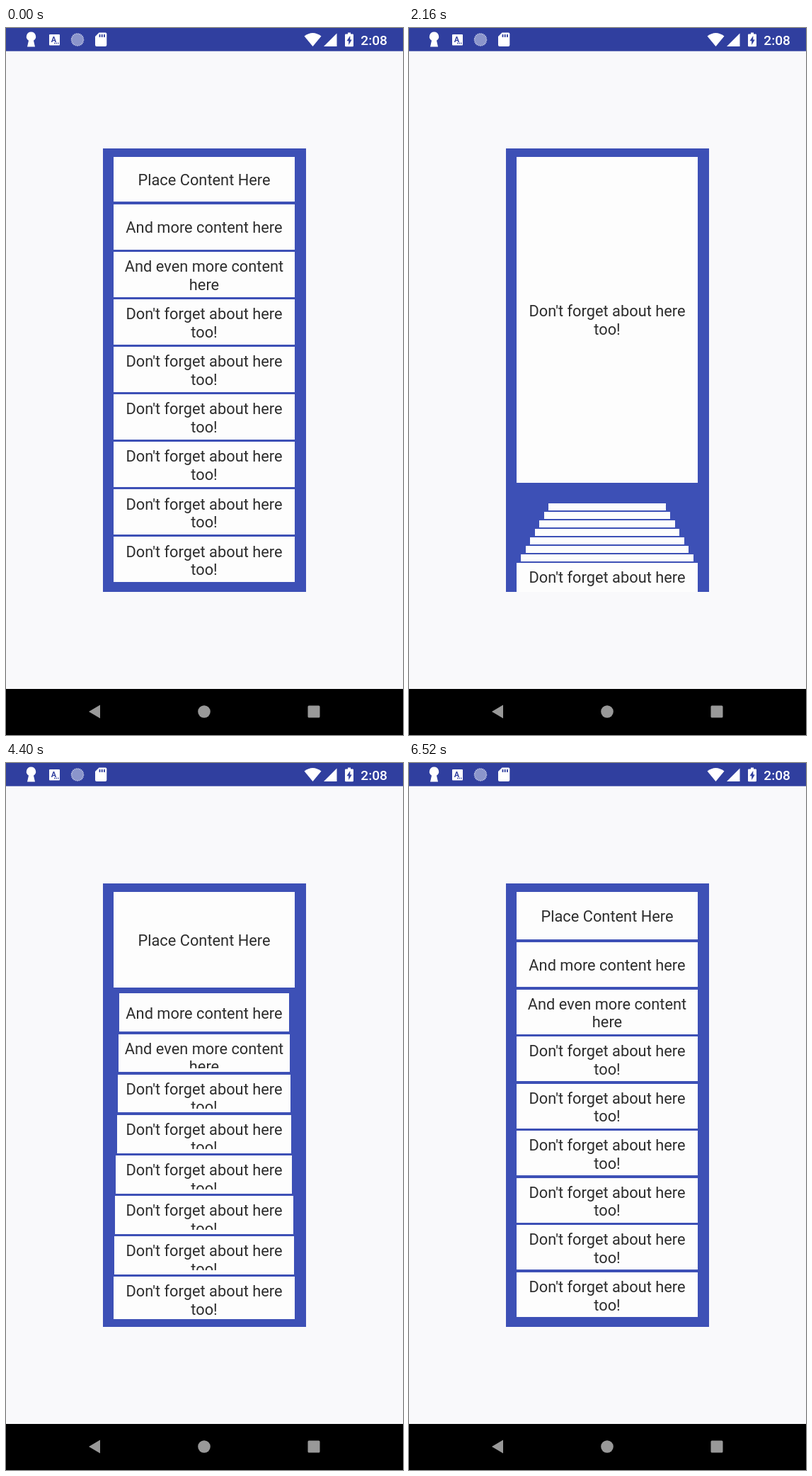
An HTML page for the animation above (7960 ms loop, 561 px wide and 998 px high).

```html
<!DOCTYPE html>
<html lang="en">
<head>
<meta charset="utf-8">
<title>Expanding list</title>
<style>
  html, body { margin: 0; width: 100%; height: 100%; overflow: hidden; background: #f9f9fb; }
  #stage { position: relative; width: 561px; height: 998px; overflow: hidden; font-family: Roboto, sans-serif; }
  svg { position: absolute; inset: 0; }
  #panel { position: absolute; left: 137px; top: 170px; width: 287px; height: 626px; background: #3d50b6; }
  .row { position: absolute; background: #fdfdfd; }
  .clip { position: absolute; left: 0; right: 0; top: 5.45px; overflow: hidden; }
  .label {
    position: absolute; left: 50%; transform: translateX(-50%); padding: 2.8px 0 .6px;
    font-size: 21.82px; line-height: 25.57px; color: #2d2d2d; text-align: center; white-space: pre;
  }
</style>
</head>
<body>
<div id="stage">
  <div id="panel"></div>
  <svg width="561" height="998" viewBox="0 0 561 998" fill="#fff">
    <rect width="561" height="32.7" fill="#303f9f"/>
    <!-- notifications -->
    <path d="M35.500 5.500a6.600 6.600 0 0 1 3.500 12.200L41 26.500H30L32 17.700A6.600 6.600 0 0 1 35.500 5.500Z"/>
    <rect x="61" y="9" width="15" height="15.500" rx="1"/>
    <text x="67.500" y="19.500" font-size="11" font-weight="700" text-anchor="middle" fill="#303f9f">A</text>
    <path d="M68 21.500h1.500M70.500 21.500h1.500M73 21.500h1.500" stroke="#303f9f" stroke-width="1.500"/>
    <circle cx="101" cy="16.500" r="8.500" fill="#8b95cb" stroke="#c3c8e5" stroke-width="1.500" stroke-dasharray="1.500 1"/>
    <path d="M131.500 6.500H140.500a1.800 1.800 0 0 1 1.800 1.800V24a2 2 0 0 1-2 2H128a2 2 0 0 1-2-2V12Z"/>
    <path d="M132.500 9v4M135.700 9v4M139 9v4" stroke="#303f9f" stroke-width="1.800"/>
    <!-- system status -->
    <path d="M433.500 26L421.500 11.500Q433.500 2.500 445.500 11.500Z"/>
    <path d="M449 26H467.500V7.500Z"/>
    <path d="M483 6.500h4v2h2.700a1.300 1.300 0 0 1 1.300 1.300V25a1.300 1.300 0 0 1-1.300 1.300h-9.400A1.300 1.300 0 0 1 479 25V9.800a1.300 1.300 0 0 1 1.300-1.300H483Z"/>
    <path d="M486.300 11L481.500 18.200h2.700V24L488.700 16.500h-2.400Z" fill="#303f9f"/>
    <text x="501.300" y="23.800" font-size="19.1" font-weight="500">2:08</text>
    <!-- navigation -->
    <rect y="933" width="561" height="65" fill="#000"/>
    <g fill="#999">
      <path d="M117 965L133 955.500V974.500Z"/>
      <circle cx="280" cy="965" r="8.800"/>
      <rect x="426.500" y="956.500" width="17" height="17" rx="1.500"/>
    </g>
  </svg>
</div>
<script>
const LOOP = 7960, STEP = 40;
const LEFT = 152, WIDTH = 256, PANEL_X = 137, PANEL_Y = 170;
const PADDING = 5.45, LINE = 25.57, FONT_PADDING = 3.4;

const labels = ["Place Content Here", "And more content here", "And even more content\nhere",
  ...Array(6).fill("Don't forget about here\ntoo!")];

// phase runs linearly between start and end, then holds
const moves = [
  { row: 7, start: 1960, end: 2160, phase: [0.1, 1], opens: true },
  { row: 7, start: 3120, end: 3320, phase: [0.095, 0.845], opens: false },
  { row: 0, start: 4400, end: 4560, phase: [0.28, 1], opens: true },
  { row: 0, start: 6320, end: 6520, phase: [0.1, 0.936], opens: false },
];

const mix = (a, b, p) => a + (b - a) * p;
const ease = t => 0.5 - 0.5 * Math.cos(Math.PI * t);

function element(parent, className) {
  const node = document.createElement("div");
  node.className = className;
  return parent.appendChild(node);
}

const rows = labels.map(text => {
  const box = element(document.getElementById("panel"), "row");
  const clip = element(box, "clip");
  const label = element(clip, "label");
  label.textContent = text;
  return { box, clip, label, textHeight: text.split("\n").length * LINE + FONT_PADDING };
});

const collapsed = i => ({ top: 181.8 + 67.07 * i, height: 63.7, inset: 0 });

function opened(i, selected) {
  if (i === selected) return { top: 181.8, height: 460.2, inset: 0 };
  const depth = rows.length - 1 - i - (selected > i ? 1 : 0);
  return { top: 755.1 - 12 * depth, height: depth ? 9.6 : 40.5, inset: 6.43 * depth };
}

function stateAt(time) {
  const move = moves.filter(m => m.start <= time).pop();
  if (!move) return { selected: -1, progress: 0 };
  const done = Math.min(1, (time - move.start) / (move.end - move.start));
  const p = ease(mix(...move.phase, done));
  return { selected: move.row, progress: move.opens ? p : 1 - p };
}

function draw(time) {
  const { selected, progress } = stateAt(time);
  rows.forEach(({ box, clip, label, textHeight }, i) => {
    const from = collapsed(i), to = opened(i, selected);
    const [top, height, inset] = ["top", "height", "inset"].map(k => mix(from[k], to[k], progress));
    const inner = Math.max(0, height - 2 * PADDING);
    Object.assign(box.style, {
      left: LEFT - PANEL_X + inset + "px",
      top: top - PANEL_Y + "px",
      width: WIDTH - 2 * inset + "px",
      height: height + "px",
      zIndex: i === selected ? 1 : 0,
    });
    clip.style.height = inner + "px";
    label.style.top = Math.max(0, (inner - textHeight) / 2) + "px";
  });
}

function tick() {
  draw(Math.floor(performance.now() % LOOP / STEP) * STEP);
  requestAnimationFrame(tick);
}
tick();
</script>
</body>
</html>
```
